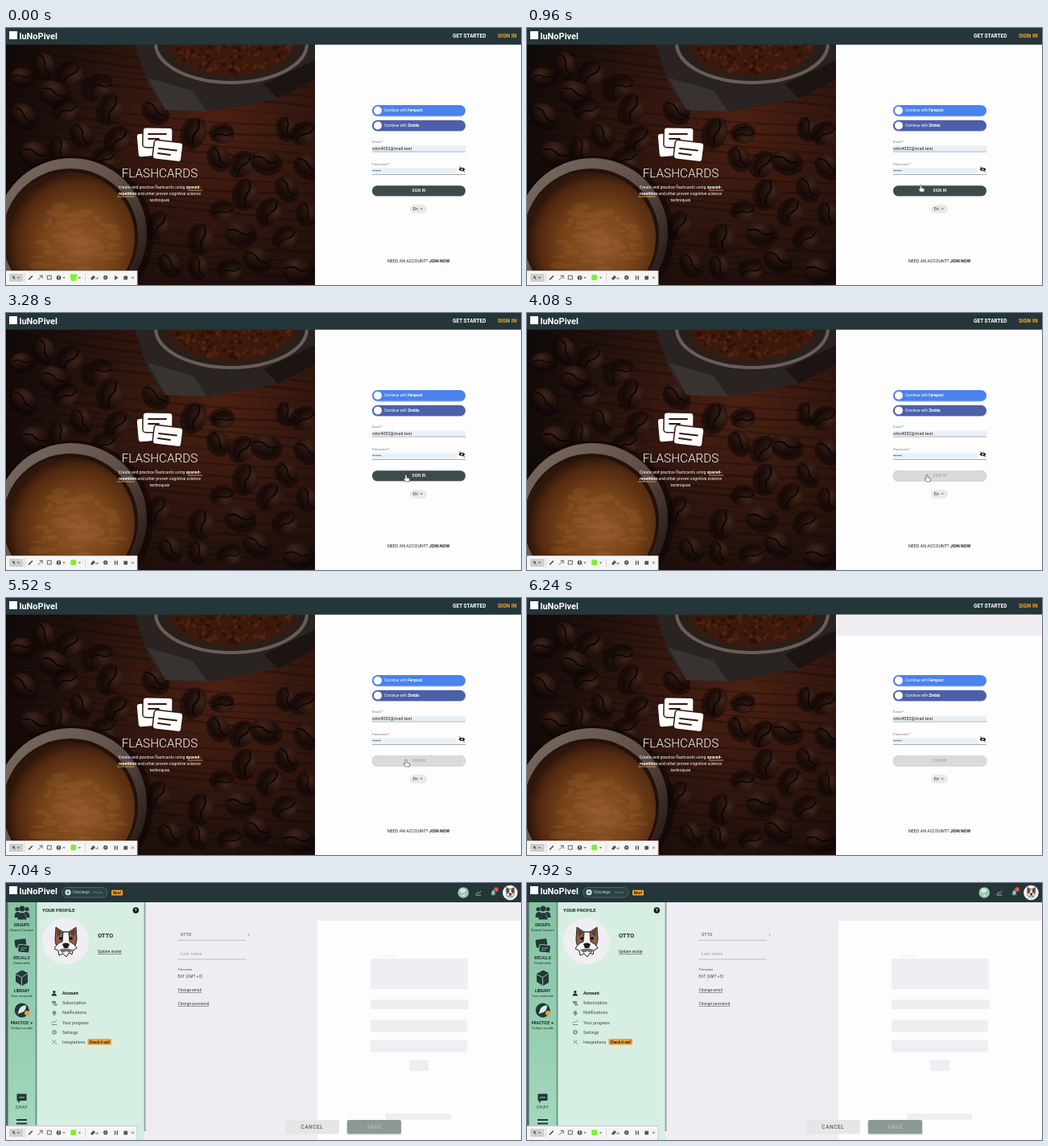
An HTML page for the animation above (8000 ms loop, 640 px wide and 320 px high).

```html
<!DOCTYPE html>
<html lang="en">
<head>
<meta charset="utf-8">
<title>Sign in</title>
<style>
html, body { margin: 0; width: 100%; height: 100%; overflow: hidden; background: #fdfdfd; }
svg { display: block; width: 640px; height: 320px; }
text { font: 5px Roboto, sans-serif; white-space: pre; }
.m { text-anchor: middle; }
.b { font-weight: 700; }
.w { fill: #fff; }
.line { fill: none; stroke: currentColor; stroke-linecap: round; stroke-linejoin: round; }

.to-start, .from-start, .off, .strip, .app, .late, .arrow, .hand { animation: 8s step-end infinite; }
.to-start { animation-name: to-start; }
.from-start { animation-name: from-start; }
.off { animation-name: off; }
.strip { animation-name: strip; }
.app { animation-name: app; }
.late { animation-name: late; }
.arrow { animation-name: arrow; }
.hand { animation-name: hand; }
.move { animation: move 8s infinite; }
@keyframes to-start { 0% { opacity: 1 } .95%, 100% { opacity: 0 } }
@keyframes from-start { 0% { opacity: 0 } .95%, 100% { opacity: 1 } }
@keyframes off { 0% { opacity: 0 } 45.95%, 100% { opacity: 1 } }
@keyframes strip { 0% { opacity: 0 } 76.95%, 100% { opacity: 1 } }
@keyframes app { 0% { opacity: 0 } 78.95%, 100% { opacity: 1 } }
@keyframes late { 0% { opacity: 0 } 86.95%, 100% { opacity: 1 } }
@keyframes arrow { 0% { opacity: 0 } 3.95% { opacity: 1 } 12%, 100% { opacity: 0 } }
@keyframes hand { 0% { opacity: 0 } 12% { opacity: 1 } 76.95%, 100% { opacity: 0 } }
@keyframes move {
  0%, 4% { transform: translate(-96px, -73px); animation-timing-function: ease-in-out; }
  14%, 100% { transform: none; }
}
</style>
</head>
<body>
<svg viewBox="0 0 640 320">
<defs>
  <radialGradient id="wood" gradientUnits="userSpaceOnUse" cx="265" cy="118" r="270">
    <stop offset="0" stop-color="#4c2113"/><stop offset=".3" stop-color="#3a190f"/>
    <stop offset=".65" stop-color="#25120d"/><stop offset="1" stop-color="#120a08"/>
  </radialGradient>
  <radialGradient id="roast" cx=".4" cy=".3" r=".75">
    <stop offset="0" stop-color="#3f241a"/><stop offset=".5" stop-color="#26130e"/><stop offset="1" stop-color="#0f0706"/>
  </radialGradient>
  <radialGradient id="crema" cx=".58" cy=".55" r=".55">
    <stop offset="0" stop-color="#91592c"/><stop offset=".5" stop-color="#784319"/>
    <stop offset=".85" stop-color="#532a10"/><stop offset="1" stop-color="#2e160b"/>
  </radialGradient>
  <linearGradient id="china" x1=".1" y1="0" x2="1" y2=".7">
    <stop offset="0" stop-color="#776a60"/><stop offset=".55" stop-color="#62514a"/><stop offset="1" stop-color="#281a16"/>
  </linearGradient>
  <clipPath id="photo"><path d="M0 20H384V320H0z"/></clipPath>
  <linearGradient id="side" x2="0" y2="1">
    <stop offset="0" stop-color="#84c2a3"/><stop offset="1" stop-color="#a5d9be"/>
  </linearGradient>
  <g id="bean">
    <ellipse cx="2" cy="3" rx="18" ry="14" fill="#0a0504" opacity=".5"/>
    <ellipse rx="16" ry="12" fill="url(#roast)"/>
    <path d="M-14 1Q-6-4 0 0T14-1" fill="none" stroke="#0c0504" stroke-width="1.800"/>
  </g>
  <g id="dog">
    <path d="M-13-3L-12-18L-3-12H4L13-18L14-3Q13 6 8 9H-8Q-13 5-13-3z" fill="#8f5f48" stroke="#272220"/>
    <path d="M-11-16L-4-11L-10-6zM12-16L5-11L11-6z" fill="#54403a"/>
    <path d="M-3-12H4L5 0Q12 3 14 8L9 11L8 16L4 14L1 19L-3 15L-8 17L-9 11L-14 9Q-11 2-4 0z" fill="#f4f2f2" stroke="#272220"/>
    <path d="M-4 3Q0 0 5 3L3 8H-2z" fill="#1d1b1c"/>
    <path d="M-8 10Q0 7 9 10L6 14L1 12L-4 14z" fill="#77706f"/>
    <circle cx="-6" cy="-4" r="1.800"/><circle cx="7" cy="-4" r="1.800"/>
  </g>
  <g id="brand">
    <path d="M4 4H14V14H4z" class="w"/>
    <text x="16.500" y="13.500" class="w b" style="font-size:11px">luNoPivel</text>
  </g>
  <path id="down" d="M-2-1H2L0 1.200z"/>
</defs>

<!-- sign-in page -->
<path d="M0 0H640V320H0z" fill="#fdfdfd"/>
<g clip-path="url(#photo)">
  <path d="M0 20H384V320H0z" fill="url(#wood)"/>
  <g id="grain" fill="none" stroke="#0f0706" stroke-opacity=".35"/>
  <g id="beans"/>
  <path d="M160 20L176 70L198 102L250 104L338 88L384 64V20z" fill="#292322"/>
  <path d="M176 62L198 102L250 104L232 78z" fill="#383231"/>
  <path d="M320 70L338 88L384 64V40z" fill="#1b1413"/>
  <ellipse cx="280" cy="20" rx="96" ry="50" fill="#6a5d57"/>
  <ellipse cx="280" cy="19" rx="92" ry="47" fill="#2a1e1b"/>
  <ellipse cx="280" cy="19" rx="78" ry="40" fill="#3d190c"/>
  <g id="grounds"/>
  <circle cx="84" cy="258" r="99" fill="#0c0605" opacity=".6"/>
  <circle cx="81" cy="256" r="94" fill="url(#china)"/>
  <circle cx="80" cy="259" r="84" fill="#23110b"/>
  <circle cx="78" cy="261" r="82" fill="url(#crema)"/>
  <g id="foam" fill="#b47a4a" opacity=".16"/>
</g>

<g fill="#fff" stroke="#33180f" stroke-width="1.500">
  <rect x="163" y="130" width="34" height="30" rx="4" transform="rotate(-5 180 145)"/>
  <rect x="170" y="124" width="37" height="25" rx="4" transform="rotate(1 188 136)"/>
  <rect x="183" y="141" width="36" height="24" rx="4" transform="rotate(7 201 153)"/>
  <path d="M177 132H199M177 138H190M190 150L212 152.500M189 156L204 158" stroke-linecap="round" stroke-width="1.800"/>
</g>
<g class="m w">
  <text x="191" y="186" style="font-size:15.300px;font-weight:300">FLASHCARDS</text>
  <text x="191" y="200.300" style="font-size:5.100px">Create and practice flashcards using <tspan class="b">spaced-</tspan></text>
  <text x="191" y="208.300" style="font-size:5.100px"><tspan class="b">repetition</tspan> and other proven cognitive science</text>
  <text x="191" y="216.300" style="font-size:5.100px">techniques</text>
  <path d="M226 202H244.500M138 210H160" stroke="#e8a33c" stroke-width=".9"/>
</g>

<path d="M0 0H640V20.700H0z" fill="#243639"/>
<use href="#brand"/>
<text x="555" y="12" class="w b" style="font-size:6.500px">GET STARTED</text>
<text x="611" y="12" class="b" fill="#f0a435" style="font-size:6.700px">SIGN IN</text>

<rect x="455" y="96.800" width="116" height="13.600" rx="6.800" fill="#bcc4d4"/>
<rect x="455" y="96" width="116" height="13.400" rx="6.700" fill="#4a82ee"/>
<rect x="455" y="115.500" width="116" height="13.400" rx="6.700" fill="#b9bfd0"/>
<rect x="455" y="114.700" width="116" height="13.400" rx="6.700" fill="#4b60a8"/>
<circle cx="462" cy="102.700" r="5" class="w"/>
<circle cx="462" cy="121.400" r="5" class="w"/>
<text x="470" y="104.300" class="w" style="font-size:4.600px">Continue with <tspan class="b">Fernpost</tspan></text>
<text x="470" y="123" class="w" style="font-size:4.600px">Continue with <tspan class="b">Zimbla</tspan></text>

<text x="455" y="143.300" fill="#777" style="font-size:4.300px">Email *</text>
<path d="M455 146.500H571V153H455zM455 174.500H560V181.500H455z" fill="#e8f1f8"/>
<text x="455" y="151.500" fill="#222" style="font-size:5.600px">otto4052@mail.test</text>
<text x="455" y="171.300" fill="#777" style="font-size:4.300px">Password *</text>
<path d="M456 177.500H466" stroke="#2b3f52" stroke-width="1.400" stroke-linecap="round" stroke-dasharray="0 2.250"/>
<path d="M455 154H571M455 182.500H571" stroke="#888" stroke-width=".7"/>
<path d="M562.500 176Q566.500 171.500 570.500 176Q566.500 180.500 562.500 176z"/>
<circle cx="566.500" cy="176" r="1.500" class="w"/>
<path d="M563.200 172.500L570 179.500" stroke="#000" stroke-width=".9"/>

<rect x="455" y="197" width="116" height="13" rx="6.500" fill="#b8bcbc"/>
<rect x="455" y="196.200" width="116" height="12.800" rx="6.400" fill="#3d4b4d"/>
<text x="513" y="204.300" class="m w" style="font-size:4.800px;font-weight:500">SIGN IN</text>
<g class="off">
  <rect x="454.500" y="196" width="117" height="14" rx="7" fill="#dadada"/>
  <text x="513" y="204.300" class="m" fill="#a8a8a8" style="font-size:4.800px;font-weight:500">SIGN IN</text>
</g>
<rect x="502" y="220" width="21" height="10.800" rx="5.400" fill="#e9e9e9"/>
<text x="506" y="227.200" fill="#222" style="font-size:5.200px">En</text>
<use href="#down" transform="translate(516.300 225.300) scale(.8)" fill="#666"/>
<text x="474" y="291.800" fill="#222" style="font-size:5.350px">NEED AN ACCOUNT? <tspan class="b">JOIN NOW</tspan></text>

<path class="strip" d="M385 20.700H640V47H385z" fill="#efedf2"/>

<g class="move">
  <path class="arrow" d="M496 201V211L498.300 208.800L500 212.500L501.500 211.800L499.800 208.300H503z" fill="#fff" stroke="#222" stroke-width=".6"/>
  <path class="hand" d="M496 202.500Q496 201.300 497 201.300T498 202.500V205L501 205.700Q502 206 501.800 207L501 210H496.500L494 206.800Q494.500 205.500 496 206.600z" fill="#fff" stroke="#333" stroke-width=".6"/>
</g>

<!-- profile page -->
<g class="app">
  <path d="M0 0H640V320H0z" fill="#efedf2"/>
  <path d="M387 47H640V320H387z" fill="#fdfdfd"/>
  <path d="M453 94H574V132H453zM462 90.500H486V91.500H462zM453 145H575V157H453zM453 170H573V186H453zM453 196H573V211H453zM501 220H525V234H501zM472 287H553V295H472z" fill="#f0eef2"/>

  <path d="M0 24H3V320H0z" fill="#52665f"/>
  <path d="M2.500 24H38V320H2.500z" fill="url(#side)"/>
  <path d="M38 24H172V320H38z" fill="#d7eee2"/>
  <path d="M36.500 24H38.500V320H36.500z" fill="#6c9a84"/>
  <path d="M171.500 24H173.500V309H171.500z" fill="#9ba5a4"/>
  <path d="M0 0H640V24H0z" fill="#243639"/>
  <use href="#brand"/>

  <path class="line" color="#a6b5b4" d="M584 13.500L586.500 11.500L588 12.500L590.500 10M584 15H590"/>
  <path d="M602.500 14.500Q603.500 13.500 603.500 11.500Q603.500 9 605.500 9T607.500 11.500Q607.500 13.500 608.500 14.500zM604.500 15H606.500L605.500 16z" fill="#86ccac"/>
  <circle cx="626.500" cy="12" r="9.300" fill="#f4f3f5"/>
  <use href="#dog" transform="translate(626.500 12) scale(.38)"/>

  <g fill="#243639">
    <circle cx="14" cy="32.500" r="2.600"/><circle cx="26" cy="32.500" r="2.600"/><circle cx="20" cy="32" r="3.400"/>
    <path d="M10.500 43Q10.500 36 14.500 36T17 38L15 43zM29.500 43Q29.500 36 25.500 36T23 38L25 43zM14.500 45.500Q14.500 37 20 37T25.500 45.500z"/>
    <rect x="11" y="70" width="14" height="10" rx="1.500" transform="rotate(-8 18 75)"/>
    <rect x="15" y="77" width="14" height="9.500" rx="1.500" stroke="#8bc6a9" transform="rotate(6 22 82)"/>
    <path d="M18 81H26M18 83.500H23" stroke="#8bc6a9" stroke-width=".8"/>
    <path d="M12 113L20 108.500L27 112V124L20 128L12 123z"/>
    <path d="M12.500 114L19.500 117.500L26.500 113M19.500 117.500V127" class="line" color="#8bc6a9"/>
    <circle cx="19.700" cy="158.500" r="9"/>
    <path d="M14.500 163L17 156Q20 152 25 152.500Q25 158 21.500 160.500z" fill="#d7eee2"/>
    <circle cx="26" cy="162" r="3" fill="#eda136"/>
    <path d="M13.500 262.500H25.500V271H18L15 274V271H13.500z"/>
    <path d="M16 267H23" stroke="#a5d9be"/>
    <path d="M13 294H26V296H13zM13 298.500H26V300.500H13z"/>
    <use href="#down" x="31.500" y="174.500"/>
  </g>
  <g id="nav" class="m" fill="#1d2c2d"></g>
  <text x="19.500" y="280.800" class="m" fill="#1d2c2d" style="font-size:5.400px;letter-spacing:.3px">CHAT</text>

  <text x="45" y="36.200" class="b" fill="#1f2b2c" style="font-size:6px">YOUR PROFILE</text>
  <circle cx="161.300" cy="34" r="3.700" fill="#111"/>
  <text x="161.300" y="36.200" class="m w b" style="font-size:6px">?</text>
  <circle cx="74" cy="72.500" r="29" fill="#efeef2"/>
  <use href="#dog" x="74" y="73"/>
  <text x="114" y="68.400" class="b" fill="#1f2b2c" style="font-size:7.500px">OTTO</text>
  <text x="114" y="87" fill="#1f2b2c" style="font-size:4.800px;text-decoration:underline">Update avatar</text>
  <g id="menu" fill="#34494a"></g>
  <g fill="#1f2b2c"><circle cx="59.800" cy="135.600" r="1.700"/><path d="M56.500 140.500Q57 137.600 59.800 137.600T63 140.500z"/></g>
  <g fill="#5f9c80">
    <path d="M57 147H62V150H57zM59 150.500H63.500V152.500H59z"/>
    <path d="M57 163.500Q58 162.500 58 161Q58 159 60 159T62 161Q62 162.500 63 163.500zM59 164H61V165H59z"/>
    <circle cx="60" cy="185.700" r="2" fill="none" stroke="#5f9c80" stroke-width="1.500"/>
    <path class="line" color="#5f9c80" d="M57 174.500L59 172.500L60.500 173.500L63 171M57 176.500H63M57.500 200L62 196M58 196L60 198M62 199V200.500"/>
  </g>

  <g fill="#333">
    <text x="217" y="66.200" style="font-size:4.900px;letter-spacing:.3px">OTTO</text>
    <text x="300.500" y="66.500" fill="#777" style="font-size:4.500px">*</text>
    <text x="217" y="89.800" fill="#999" style="font-size:5px;letter-spacing:.35px">Last name</text>
    <text x="213.500" y="108.800" style="font-size:3.800px;letter-spacing:.15px">Timezone</text>
    <text x="213.500" y="118.300" style="font-size:4.500px;letter-spacing:.25px">EAT (GMT +3)</text>
    <text x="213.500" y="135.200" style="font-size:4.600px;letter-spacing:.15px;text-decoration:underline">Change email</text>
    <text x="213.500" y="152" style="font-size:4.600px;letter-spacing:.15px;text-decoration:underline">Change password</text>
    <path d="M213.500 71.300H298M213.500 95H298" stroke="#aaa" stroke-width=".7"/>
  </g>
  <rect x="347" y="295" width="67" height="17.500" rx="2" fill="#e6e5e8"/>
  <rect x="423.500" y="295.500" width="68" height="18" rx="2" fill="#c9cccd"/>
  <rect x="424" y="295" width="67" height="17" rx="2" fill="#8b9997"/>
  <text x="380.300" y="306" class="m" fill="#3c4748" style="font-size:6.600px;letter-spacing:.5px">CANCEL</text>
  <text x="457.700" y="306" class="m" fill="#c3cbca" style="font-size:6.600px;letter-spacing:.5px">SAVE</text>

  <g class="late">
    <rect x="69.500" y="5.500" width="56.500" height="12.500" rx="6.200" fill="#2b4144" stroke="#637577" stroke-width=".7"/>
    <circle cx="77" cy="11.700" r="3.600" fill="#d5eadf"/>
    <path d="M77 9.500V14M74.800 11.700H79.200" stroke="#3b7760"/>
    <text x="83" y="13.300" fill="#c9d5d3" style="font-size:4.600px">Concierge</text>
    <text x="108" y="13.200" fill="#849594" style="font-size:4.300px">Ctrl+K</text>
    <rect x="131" y="8.800" width="14" height="6.700" rx="1" fill="#eda136"/>
    <text x="138" y="13.800" class="m b" fill="#322" style="font-size:4.600px">New!</text>
    <circle cx="568.300" cy="12" r="6.800" fill="#9cc7b2"/>
    <path d="M564 8Q568 5 572 9L569 12L565 12zM566 15L571 14L569 17z" fill="#d5e9df"/>
    <circle cx="609" cy="8" r="3" fill="#dc4338"/>
    <text x="609" y="9.600" class="m w" style="font-size:4.300px">1</text>
    <rect x="101.500" y="194" width="29.500" height="7.500" rx="1" fill="#eda136"/>
    <text x="116.200" y="199.500" class="m b" fill="#322" style="font-size:4.600px">Check it out!</text>
  </g>
</g>

<!-- recorder toolbar -->
<g fill="#555">
  <rect x="-.5" y="302.500" width="163.500" height="18" fill="#f5f5f5" stroke="#c9c9c9"/>
  <path d="M4 306H21.500V316H4z" fill="#cfcfcf"/>
  <path d="M8 308.500L11.500 310L10.200 310.800L11.500 312.800L10.800 313.200L9.500 311.300L8.500 312.200z"/>
  <path d="M23.500 305V317M98.500 305V317" stroke="#ccc" stroke-width=".7"/>
  <path class="line" color="#444" stroke-width="1.500" d="M28.500 313L32.500 309"/>
  <path class="line" color="#444" stroke-width=".8" d="M40 313.500L45 308.500M42 308.300H45.200V311.500M51.700 308.300H56.300V313H51.700z"/>
  <circle cx="65.500" cy="310.800" r="2.900"/>
  <path d="M65.500 308.800V311.500M65.500 312.300V313" stroke="#fff" stroke-width=".9"/>
  <rect x="80.300" y="307.300" width="6.800" height="6.800" rx="1" fill="#80ee30"/>
  <path class="to-start" d="M79.500 306.500H88.500L87 315H81z" fill="#80f52b"/>
  <path d="M105 312L108.500 308L111 310L108 313.500H106z"/>
  <text x="111" y="312.500" style="font-size:4px">all</text>
  <circle cx="123.700" cy="310.800" r="2.700"/><circle cx="123.700" cy="310.800" r="1" fill="#bbb"/>
  <path class="to-start" d="M135 308L139.500 311L135 314z"/>
  <path class="from-start" d="M134.800 308.500H136.200V313.500H134.800zM137.600 308.500H139V313.500H137.600z"/>
  <path d="M146.300 308.700H151V313.400H146.300z"/>
  <path class="line" color="#555" stroke-width=".8" d="M156.300 309.800L158.500 312M158.500 309.800L156.300 312"/>
  <use href="#down" transform="translate(15.500 311) scale(.8)"/>
  <use href="#down" transform="translate(72 311) scale(.8)"/>
  <use href="#down" transform="translate(91.500 311) scale(.8)"/>
</g>
</svg>
<script>
const fill = (id, html) => { document.getElementById(id).innerHTML = html; };
const repeat = (n, draw) => Array.from({ length: n }, (_, i) => draw(i)).join('');

let seed = 7;
const rand = () => (seed = seed * 16807 % 2147483647) / 2147483647;

// A random point inside an ellipse.
const scatter = (cx, cy, rx, ry) => {
  const a = rand() * 2 * Math.PI, r = Math.sqrt(rand());
  return `cx="${cx + rx * r * Math.cos(a)}" cy="${cy + ry * r * Math.sin(a)}"`;
};

const beans = [
  [20,60], [48,45], [81,58], [60,80], [108,75], [76,103], [22,108], [132,101], [119,72], [95,132], [141,139],
  [36,155], [68,150], [124,164], [186,101], [236,130], [270,133], [265,160], [296,170], [322,164],
  [350,124], [372,132], [375,170], [300,206], [270,229], [350,198], [330,229], [290,254], [375,230],
  [349,262], [312,286], [245,262], [280,302], [205,292], [191,246], [362,300], [240,296]
];
fill('beans', beans.map(([x, y], i) =>
  `<use href="#bean" transform="translate(${x} ${y}) rotate(${i * 67 % 180}) scale(${0.88 + i % 4 * 0.08})"/>`).join(''));

fill('grain', repeat(24, i => {
  const y = 28 + i * 12;
  return `<path d="M0 ${y - 30}Q190 ${y + 12 * Math.sin(i)} 384 ${y + 10}" stroke-width="${1 + i % 3}"/>`;
}));
fill('grounds', repeat(260, i =>
  `<circle ${scatter(280, 19, 75, 37)} r="${1 + rand() * 2}" fill="${i % 2 ? '#5a2813' : '#260f08'}" opacity=".7"/>`));
fill('foam', repeat(70, () => `<ellipse ${scatter(88, 270, 58, 52)} rx="${3 + rand() * 9}" ry="${1 + rand() * 4}"/>`));

const nav = [
  ['GROUPS', 'Shared Content', 53.8], ['RECALLS', 'Flashcards', 95],
  ['LIBRARY', 'Your materials', 135.5], ['PRACTICE', "Today's recalls", 176.2]
];
fill('nav', nav.map(([name, note, y], i) =>
  `<text x="${i == 3 ? 17 : 19.5}" y="${y}" class="b" style="font-size:4.8px">${name}</text>
   <text x="19.5" y="${y + 6.2}" style="font-size:4.2px">${note}</text>`).join(''));

const menu = ['Account', 'Subscription', 'Notifications', 'Your progress', 'Settings', 'Integrations'];
fill('menu', menu.map((name, i) =>
  `<text x="70" y="${139.3 + i * 12.08}" style="font-size:5.3px" ${i ? '' : 'class="b" fill="#111"'}>${name}</text>`).join(''));
</script>
</body>
</html>
```
